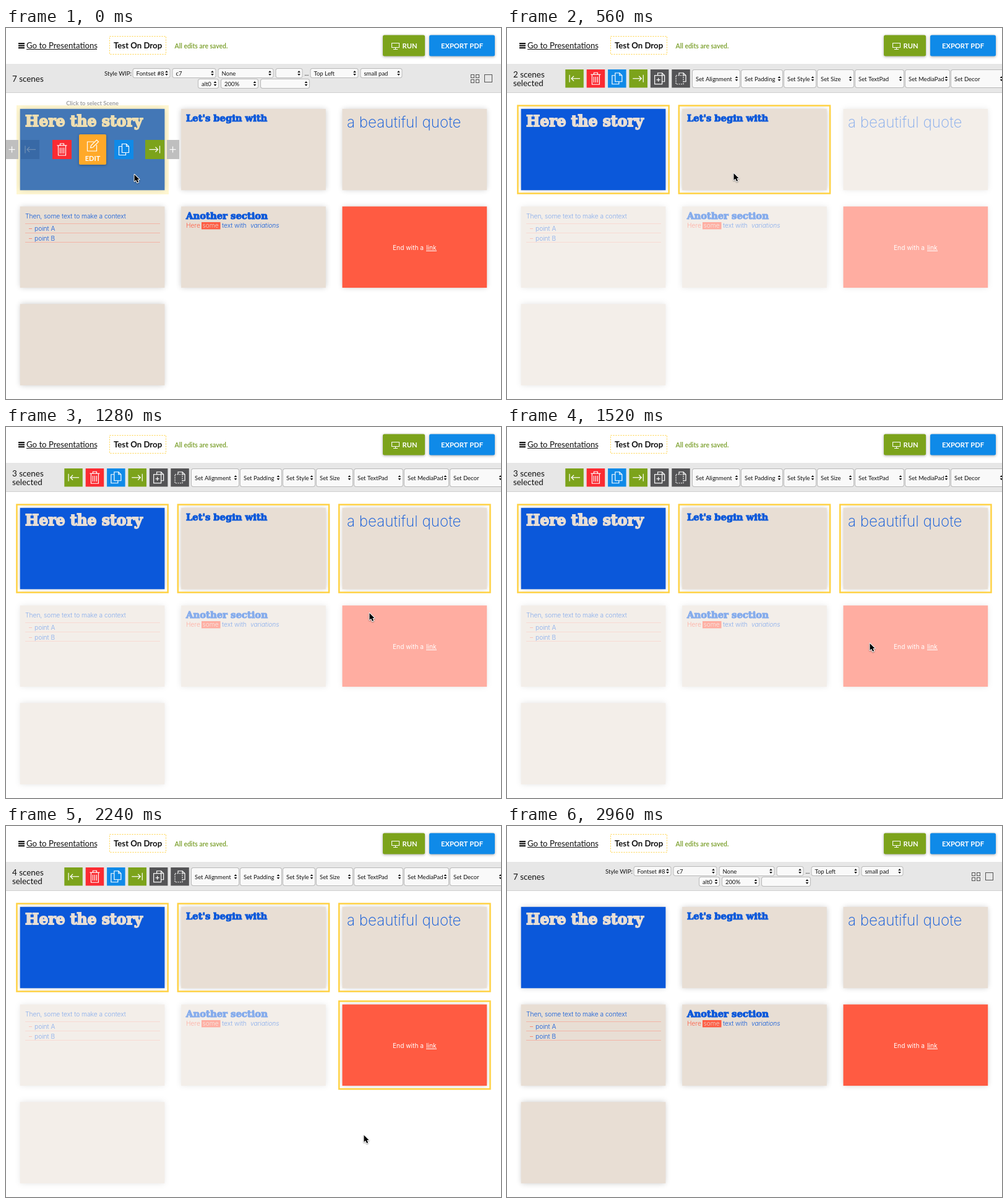
Animation of 800 by 600 pixels, one loop 3120 ms. Source, as an HTML page with a canvas:

```html
<!DOCTYPE html>
<html lang="en">
<head>
<meta charset="utf-8">
<title>Scene selection</title>
<style>
html, body { margin: 0; width: 100%; height: 100%; overflow: hidden; background: #fff; }
canvas { display: block; }
</style>
</head>
<body>
<canvas id="stage" width="800" height="600"></canvas>
<script>
const ctx = document.getElementById('stage').getContext('2d');
const LOOP = 3120, STEP = 80, CLEAR = 2400;
const UI = 'Lato, sans-serif', BODY = 'Inter, sans-serif', SLAB = '"DejaVu Serif", serif';
const C = {
  blue: '#0b58da', sand: '#e8ded4', red: '#ff5b42', yellow: '#ffd244', ink: '#111',
  green: '#7ca31b', danger: '#fb2b32', sky: '#0f8ae8', dark: '#545456', orange: '#ffa929'
};
const W = 233.7, H = 131.5;

// Cursor moves: depart, arrive, x, y
const moves = [
  [0, 1, 207, 236], [240, 480, 366, 234], [640, 880, 590, 225], [960, 1120, 587, 300],
  [1280, 1600, 586, 358], [1840, 2240, 578, 499], [2560, 2800, 830, 470]
];
// Time at which a scene joins the selection
const picks = [[160, 0], [480, 1], [960, 2], [1680, 5]];

function rect(x, y, w, h, fill) {
  ctx.fillStyle = fill;
  ctx.fillRect(x, y, w, h);
}

function frame(x, y, w, h, color, width = 1) {
  ctx.strokeStyle = color;
  ctx.lineWidth = width;
  ctx.strokeRect(x, y, w, h);
}

function rounded(x, y, w, h, r, fill) {
  ctx.beginPath();
  ctx.roundRect(x, y, w, h, r);
  ctx.fillStyle = fill;
  ctx.fill();
}

function shadow(blur, alpha, dy, draw) {
  ctx.save();
  ctx.shadowColor = `rgba(0,0,0,${alpha})`;
  ctx.shadowBlur = blur;
  ctx.shadowOffsetY = dy;
  draw();
  ctx.restore();
}

function dashed(pattern, draw) {
  ctx.setLineDash(pattern);
  draw();
  ctx.setLineDash([]);
}

function text(str, x, y, font, color = C.ink, align = 'left') {
  ctx.font = font;
  ctx.fillStyle = color;
  ctx.textAlign = align;
  ctx.fillText(str, x, y);
}

const ui = (str, x, y, size, color, align) => text(str, x, y, `${size}px ${UI}`, color, align);
const bold = (str, x, y, size, color, align) => text(str, x, y, `bold ${size}px ${UI}`, color, align);
const body = (str, x, y, color, style = '300') => text(str, x, y, `${style} 10.2px ${BODY}`, color);

function slab(str, x, y, size, color) {
  text(str, x, y, `bold ${size}px ${SLAB}`, color);
  ctx.strokeStyle = color;
  ctx.lineWidth = size * 0.075;
  ctx.miterLimit = 2;
  ctx.strokeText(str, x, y);
}

// A line through points given as x, y pairs
function line(...p) {
  ctx.beginPath();
  for (let i = 0; i < p.length; i += 2) ctx.lineTo(p[i], p[i + 1]);
  ctx.stroke();
}

function barArrow(dir) {
  line(8 * dir, -6, 8 * dir, 6);
  line(-9 * dir, 0, 5 * dir, 0);
  line(dir, -4, 5 * dir, 0, dir, 4);
}

// Folded sheet behind another one
function backSheet() {
  line(-3, -5, -3, -9, 4, -9, 8, -5, 8, 5, 4, 5);
  line(4, -9, 4, -5, 8, -5);
}

function plus(x, y, r) {
  line(x - r, y, x + r, y);
  line(x, y - r, x, y + r);
}

const icons = {
  left: () => barArrow(-1),
  right: () => barArrow(1),
  plus: () => plus(0, 0, 5),
  trash() {
    line(-8, -6.5, 8, -6.5);
    line(-3, -6.5, -3, -9.5, 3, -9.5, 3, -6.5);
    line(-6, -6.5, -6, 9.5, 6, 9.5, 6, -6.5);
    for (let x = -3; x <= 3; x += 3) line(x, -3, x, 6.5);
  },
  copy() {
    backSheet();
    line(-3, -5, -3, 5, 4, 5);
    line(-3, -5, -8, -5, -8, 9, 3, 9, 3, 5);
  },
  add() {
    backSheet();
    ctx.strokeRect(-8, -5, 12, 14);
    plus(-2, 2, 3);
  },
  outline() {
    backSheet();
    dashed([2, 1.5], () => ctx.strokeRect(-8, -5, 12, 14));
  },
  edit() {
    line(3, -6, -8, -6, -8, 9, 7, 9, 7, -1);
    line(-3, 4, -2, 0, 7, -9, 10, -6, 1, 3, -3, 4);
  }
};

function icon(name, x, y, color = '#fff') {
  ctx.save();
  ctx.translate(x, y);
  ctx.strokeStyle = color;
  ctx.lineWidth = 1.2;
  icons[name]();
  ctx.restore();
}

function tile(name, x, y, size, fill) {
  rect(x, y, size, size, fill);
  icon(name, x + size / 2, y + size / 2);
}

function select(label, x, y, w, h) {
  rounded(x, y, w, h, 4, '#b9b9b9');
  rounded(x + 1, y + 1, w - 2, h - 2, 3, '#f9f9f9');
  const mid = y + h / 2, ax = x + w - 6;
  ui(label, x + 6, mid + 3.5, 9.5);
  for (const d of [-1, 1]) {
    ctx.beginPath();
    ctx.moveTo(ax - 2.3, mid + d);
    ctx.lineTo(ax + 2.3, mid + d);
    ctx.lineTo(ax, mid + d * 4);
    ctx.fill();
  }
}

// Lays out "label:width" entries from left to right
function selectRow(list, x, y, h, gap) {
  for (const entry of list.split(',')) {
    const [label, w] = entry.split(':');
    if (label === '...') ui(label, x, y + 11.5, 9.5);
    else select(label, x, y, +w, h);
    x += +w + gap;
  }
}

function header() {
  for (let i = 0; i < 3; i++) rect(20, 24 + i * 3.5, 10, 2.2, C.ink);
  ui('Go to Presentations', 33, 32.5, 13.2);
  rect(33, 34, 114, 1, C.ink);
  dashed([2, 2], () => frame(167.5, 13.5, 91, 29, C.yellow));
  bold('Test On Drop', 174, 33, 13.2);
  bold('All edits are saved.', 272.5, 32.5, 10.4, '#84a63a');
  shadow(4, 0.35, 1, () => {
    rounded(609, 11.5, 68, 34, 2.5, C.green);
    rounded(684, 11.5, 106, 34, 2.5, C.sky);
  });
  frame(623.5, 24.5, 12, 7, '#fff');
  line(629.5, 32, 629.5, 34.5);
  line(626, 34.5, 633, 34.5);
  bold('RUN', 640.5, 33.3, 11.2, '#fff');
  bold('EXPORT PDF', 737, 33.3, 11.2, '#fff', 'center');
}

function styleBar(label, dy) {
  ui(label, 10, 87, 13.4);
  ui('Style WIP:', 159, 76.5 + dy, 9.6);
  selectRow('Fontset #8:61,c7:71,None:90,:44,...:6,Top Left:78,small pad:68', 204.5, 65 + dy, 16, 3);
  selectRow('alt0:34,200%:61,:80', 310, 82 + dy, 16, 3);
  for (let i = 0; i < 4; i++) frame(751.5 + i % 2 * 8, 75.5 + (i >> 1) * 8, 5, 5, '#555');
  frame(773.5, 75.5, 12, 12, '#555');
}

function multiBar(count) {
  ui(`${count} scenes`, 10, 79.5, 13.4);
  ui('selected', 10, 94, 13.4);
  const fills = [C.green, C.danger, C.sky, C.green, C.dark, C.dark];
  ['left', 'trash', 'copy', 'right', 'add', 'outline']
    .forEach((name, i) => tile(name, 94.3 + i * 34.4, 67, 29.5, fills[i]));
  selectRow('Set Alignment:78,Set Padding:68,Set Style:53,Set Size:60,' +
    'Set TextPad:80,Set MediaPad:73,Set Decor:88', 299, 67, 30, 1);
}

const content = [
  () => slab('Here the story', 31, 159, 23.5, C.sand),
  () => slab("Let's begin with", 291, 151, 14.7, C.blue),
  () => text('a beautiful quote', 551, 160.5, `200 24.2px ${BODY}`, C.blue),
  () => {
    body('Then, some text to make a context', 31, 308, C.blue);
    for (let i = 0; i < 3; i++) rect(31, 316 + i * 15, 218, 1, '#f3b5a7');
    ['point A', 'point B'].forEach((s, i) => {
      body('–', 37, 328 + i * 15.5, C.red);
      body(s, 46, 328 + i * 15.5, C.blue);
    });
  },
  () => {
    slab('Another section', 291, 309, 14.8, C.blue);
    body('Here', 291, 323, C.red);
    rect(316, 314, 30.5, 11.5, C.red);
    body('some', 317.5, 323, C.sand);
    body('text with', 349, 323, C.blue);
    body('variations', 395, 323, C.blue, 'italic 300');
  },
  () => {
    body('End with a', 625, 358.5, '#fff', '400');
    body('link', 679, 358.5, '#fff', '400');
    rect(679, 360, 17, 1, '#fff');
  }
];

function scene(i, chosen, faded) {
  const x = 22.7 + i % 3 * 260.4, y = 130.8 + Math.floor(i / 3) * 157.8;
  const fill = i === 0 ? C.blue : i === 5 ? C.red : C.sand;
  shadow(9, 0.2, 0, () => rect(x, y, W, H, fill));
  content[i]?.();
  if (faded) rect(x - 10, y - 10, W + 20, H + 20, 'rgba(255,255,255,.5)');
  if (chosen) frame(x - 5.25, y - 5.25, W + 10.5, H + 10.5, C.yellow, 2.5);
}

function hoverTools() {
  rect(17, 125, 246, 144, 'rgba(255,218,60,.23)');
  bold('Click to select Scene', 139.5, 125, 9.3, '#a0a0a0', 'center');
  for (const x of [0, 260]) {
    rect(x, 181, 20, 31, '#bfbfbf');
    icon('plus', x + 9.5, 196.5);
  }
  rect(24, 181, 30, 31, 'rgba(30,75,130,.3)');
  icon('left', 39, 196.5, '#7190b5');
  shadow(4, 0.3, 1, () => rounded(118, 172, 44, 49, 2, C.orange));
  tile('trash', 75, 181, 31, C.danger);
  tile('copy', 175, 181, 31, C.sky);
  tile('right', 225, 181, 31, C.green);
  icon('edit', 139.5, 190);
  bold('EDIT', 140, 214.5, 11, '#fff', 'center');
}

function cursor(t) {
  let x = 0, y = 0;
  for (const [from, to, mx, my] of moves) {
    const u = Math.min(1, Math.max(0, (t - from) / (to - from)));
    const e = from ? u * u * (3 - 2 * u) : 1;
    x += (mx - x) * e;
    y += (my - y) * e;
  }
  ctx.save();
  ctx.translate(Math.round(x) + 0.5, Math.round(y) + 1);
  const shape = new Path2D('M0 0V11L2.6 8.7 4.6 13 6.6 12 4.8 8H8Z');
  ctx.lineJoin = 'round';
  ctx.strokeStyle = '#fff';
  ctx.lineWidth = 2;
  shadow(2, 0.4, 1, () => ctx.stroke(shape));
  ctx.fillStyle = '#000';
  ctx.fill(shape);
  ctx.restore();
}

function pickedBy(t) {
  return picks.filter(([time]) => t >= time).map(([, i]) => i);
}

function draw(t) {
  const active = t < CLEAR;
  const chosen = active ? pickedBy(t) : [];
  // The toolbar trails the selection by one step
  const count = active ? pickedBy(t - STEP).length : 0;

  rect(0, 0, 800, 600, '#fff');
  header();
  rect(0, 58, 800, 47, '#e7e7e7');
  rect(0, 104, 800, 1, '#cfcfcf');
  if (count > 1) multiBar(count);
  else if (count) styleBar('1 scenes selected', 3);
  else styleBar('7 scenes', 0);

  for (let i = 0; i < 7; i++) {
    const on = chosen.includes(i);
    scene(i, on, chosen.length > 0 && !on);
  }
  if (t < picks[0][0]) hoverTools();
  cursor(t);
}

const start = performance.now();
function tick() {
  const t = Math.max(0, performance.now() - start) % LOOP;
  draw(Math.floor(t / STEP) * STEP);
  requestAnimationFrame(tick);
}
tick();
</script>
</body>
</html>
```
